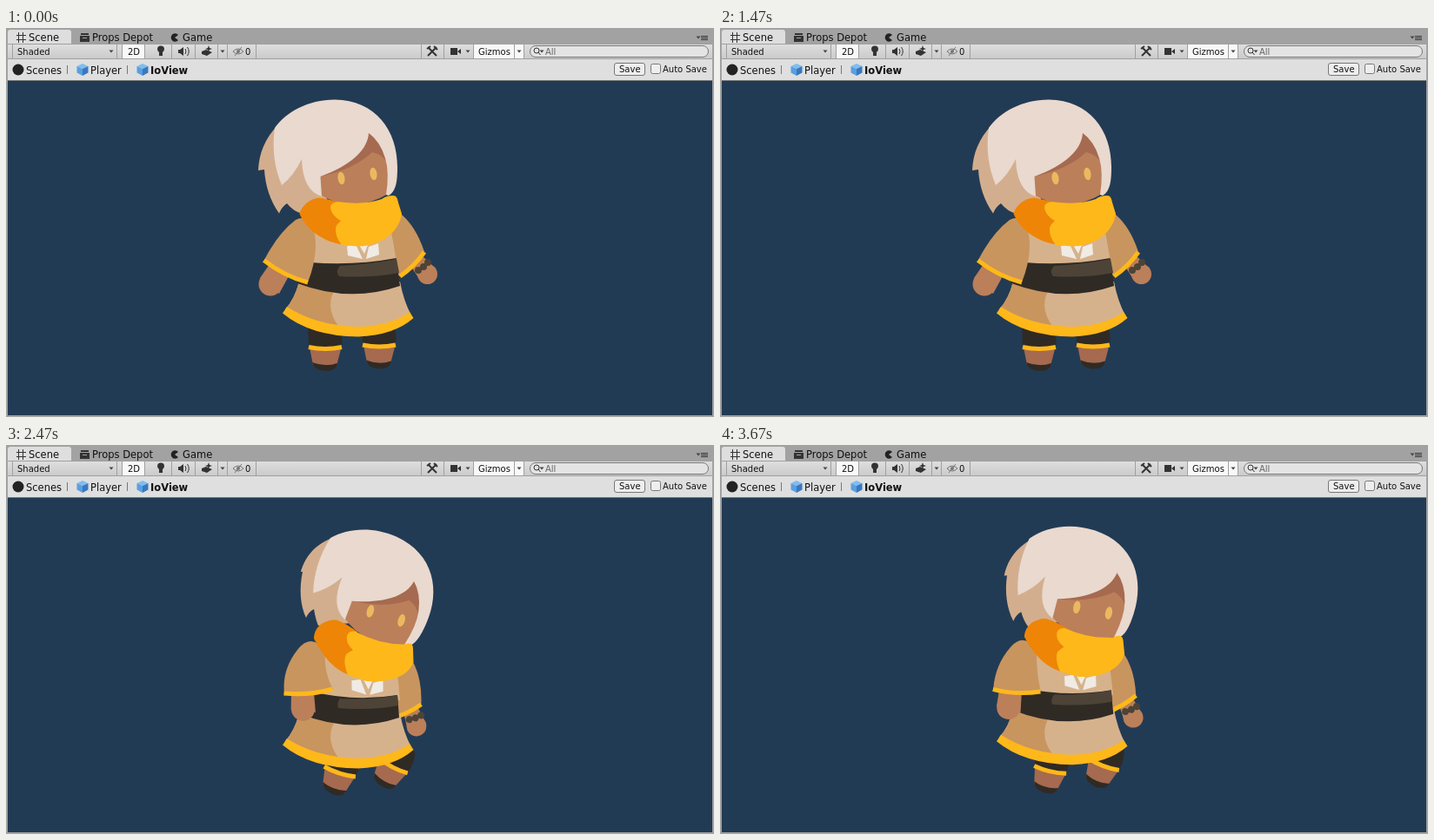
Animation of 814x448 px, one loop 3.94 s. Source, as an HTML page:

```html
<!DOCTYPE html>
<html lang="en">
<head>
<meta charset="utf-8">
<title>Scene view</title>
<style>
  html, body { margin: 0; width: 100%; height: 100%; overflow: hidden; background: #a2a2a2; }
  svg { display: block; }
  text { font: 11.5px "DejaVu Sans", sans-serif; fill: #111; }
  text.s { font-size: 10px; }
  text.b { font-weight: bold; }
  .line { fill: none; stroke: #333; }
  .white { fill: #e9d9cf; } .back { fill: #d3ae8e; } .skin { fill: #bb7f5a; } .shade { fill: #a56a4f; }
  .light { fill: #d6b28c; } .tan { fill: #c8955f; } .dark { fill: #302a25; } .brown { fill: #4d4337; }
  .gold { fill: #feb81a; } .orange { fill: #ee8506; } .collar { fill: #f0ebe4; } .eye { fill: #eab95f; }
  .trim { fill: none; stroke: #feb81a; stroke-width: 5; }
</style>
</head>
<body>
<svg width="814" height="448" viewBox="0 0 814 448">
  <defs>
    <linearGradient id="bar" x2="0" y2="1">
      <stop stop-color="#dedede"/><stop offset="1" stop-color="#cacaca"/>
    </linearGradient>
    <g id="leg">
      <path class="shade" d="M349 368L385.500 368L380 389L353 388Z"/>
      <path class="dark" d="M347 342L382 342Q388 352 386 367Q367 371 348 366Z"/>
      <path class="trim" d="M348 367.500Q367 371.500 386 367.500"/>
      <path class="dark" d="M352 385Q367 391 381 386Q380 395 367 395Q354 394 352 385Z"/>
    </g>
    <g id="cube">
      <path fill="#7fbdf0" d="M0-7L6.500-4L0-1L-6.500-4Z"/>
      <path fill="#5a9fe0" d="M-6.500-4L0-1V7L-6.500 3.500Z"/>
      <path fill="#3978bd" d="M6.500-4L0-1V7L6.500 3.500Z"/>
    </g>
    <path id="drop" fill="#444" d="M-2.500-1.500H2.500L0 1.500Z"/>
  </defs>

  <!-- tabs -->
  <path fill="#dedede" d="M2 19V5Q2 2 5 2H72Q75 2 75 5V19Z"/>
  <path class="line" d="M14.500 5V17M19.500 5V17M12 8.500H23M12 13.500H23"/>
  <text x="26" y="15">Scene</text>
  <path fill="#333" d="M85 9H96V16H85ZM86 6H95V8H86Z"/>
  <path class="line" style="stroke:#a2a2a2" d="M88 11.500H93"/>
  <text x="99" y="15">Props Depot</text>
  <path fill="#222" d="M198 8A4.700 4.700 0 1 0 198 14L194 11Z"/>
  <text x="203" y="15">Game</text>
  <path class="line" d="M799 9.500H807M799 11.500H807M799 13.500H807"/>
  <use href="#drop" x="796" y="11"/>

  <!-- toolbar -->
  <path fill="url(#bar)" d="M2 19H812V36H2Z"/>
  <path fill="#f8f8f8" d="M134 19H159V35H134ZM538 19H595V35H538Z"/>
  <path class="line" style="stroke:#a0a0a0" d="M2 18.500H812M2 35.500H812M7.500 19V35M127.500 19V35M133.500 19V35M159.500 19V35M190.500 19V35M217.500 19V35M243.500 19V35M254.500 19V35M287.500 19V35M477.500 19V35M503.500 19V35M537.500 19V35M584.500 19V35M595.500 19V35"/>
  <text class="s" x="13" y="31">Shaded</text>
  <use href="#drop" x="121" y="27"/>
  <text class="s" x="140" y="31">2D</text>
  <path fill="#333" d="M176 28Q174 26 174 24.500A4 4 0 0 1 182 24.500Q182 26 180 28V32H176Z"/>
  <path fill="#333" d="M198 25H200L204 22V32L200 29H198Z"/>
  <path class="line" d="M206 24Q208 27 206 30M208.500 22Q212 27 208.500 32"/>
  <path fill="#333" d="M225 27L230 25L237 28L231 32L225 30ZM233 20L234 23L237 24L234 25L233 27L232 25L229 24L232 23Z"/>
  <use href="#drop" x="249" y="27"/>
  <path class="line" style="stroke:#777" d="M261 27Q267 21 273 27Q267 33 261 27M263 32L271 22"/>
  <circle cx="267" cy="27" r="2" fill="#777"/>
  <text class="s" x="275" y="31">0</text>
  <path class="line" stroke-width="2" d="M485 22L495 32M495 22L485 32M484 24L488 21M492 21L496 25"/>
  <path fill="#333" d="M511 23H519V31H511ZM519 27L523 24V30Z"/>
  <use href="#drop" x="531" y="27"/>
  <text class="s" x="543" y="31">Gizmos</text>
  <use href="#drop" x="590" y="27"/>
  <rect x="602.500" y="20.500" width="205" height="13" rx="6.500" fill="#e4e4e4" stroke="#777"/>
  <circle class="line" cx="610" cy="26" r="3"/>
  <path class="line" d="M612 28L614.500 31"/>
  <use href="#drop" x="616" y="27"/>
  <text class="s" x="620" y="31" style="fill:#666">All</text>

  <!-- breadcrumbs -->
  <path fill="#dfdfdf" d="M2 36H812V60H2Z"/>
  <circle cx="14" cy="48" r="6.500" fill="#222"/>
  <text x="23" y="53">Scenes</text>
  <path class="line" style="stroke:#777" d="M70.500 43V53M139.500 43V53"/>
  <use href="#cube" x="88" y="48"/>
  <text x="97" y="53">Player</text>
  <use href="#cube" x="157" y="48"/>
  <text class="b" x="166" y="53">IoView</text>
  <rect x="699.500" y="40.500" width="35" height="14" rx="2.500" fill="#eee" stroke="#777"/>
  <text class="s" x="705" y="51">Save</text>
  <rect x="741.500" y="41.500" width="11" height="11" rx="2" fill="#eee" stroke="#777"/>
  <text class="s" x="755" y="51">Auto Save</text>

  <path fill="#223b54" d="M2 61H812V446H2Z"/>
  <path class="line" style="stroke:#777" d="M2 60.500H812"/>

  <!-- character: soft parts bend from d to data-lean, rigid groups turn -->
  <g id="legL"><use href="#leg"/></g>
  <g id="legR"><use href="#leg" x="62" y="-2.500"/></g>
  <g id="armR">
    <path class="skin" d="M464 272L478 262L494 277L477 292Z"/>
    <circle class="skin" cx="484.500" cy="283.500" r="11.500"/>
    <g class="brown"><circle cx="474" cy="279" r="4"/><circle cx="480" cy="275" r="4"/><circle cx="485" cy="270" r="4"/></g>
    <path class="tan" d="M438 215H455Q472 230 481 258Q470 274 453 286L436 275Z"/>
    <path class="trim" d="M481 258Q470 274 453 286"/>
  </g>
  <g id="skirt">
    <path class="light" d="M337 292H453Q457 314 466 331Q445 350 402 350Q350 348 321 324Q332 312 337 292Z"/>
    <path class="tan" d="M337 292Q332 312 321 324Q350 347 386 348Q366 325 377 303Z"/>
    <path class="gold" d="M318 328.500Q350 355 405 355.500Q446 354 468.500 334L464 327Q440 344 402 344Q355 342 323 321Z"/>
  </g>
  <g id="torso">
    <path class="light" d="M345 222L441 225Q446 250 449 270L348 276Z"/>
    <path class="collar" d="M392 251L402 249L410 266L393 262ZM417 252L428 248L429 261L414 266ZM406 250H416L412 260Z"/>
  </g>
  <path class="dark" d="M350 270Q400 274 448.500 265L453 297Q395 317 335 294Z"
    data-lean="M352 284Q400 296 450 288L452 314Q395 333 337 309Z"/>
  <path class="brown" d="M384 274Q420 272 449 266L452 282Q420 288 383 286Q378 280 384 274Z"
    data-lean="M384 292Q420 294 450 288L451 300Q420 306 382 303Q380 297 384 292Z"/>
  <g id="handL">
    <path class="skin" d="M303 272L292 288L314 306L326 284Z"/>
    <circle class="skin" cx="304" cy="295" r="13.500"/>
  </g>
  <path class="tan" d="M297 267Q313 236 333 221Q348 213 355 238Q359 262 347 293Q320 286 297 267Z"
    data-lean="M320 286Q317 259 335 236Q350 216 367 236Q365 262 376 281Q348 289 320 286Z"/>
  <path class="trim" d="M296.500 267.500Q320 286 347 293" data-lean="M319.500 286Q348 289 375.500 281"/>
  <path class="back" d="M313 111C297 128 291 145 290 164L297 163C298 182 304 199 314 213.500Q317 206 323 202Q330 211 341 214L370 200L345 120Z"
    data-lean="M375 107C352 116 343 132 339 146L341 146C337 165 338 184 345 199Q348 192 354 189Q356 201 359 208L398 205L390 120Z"/>
  <g id="head">
    <path class="skin" d="M361 165L418 115L441 145V190Q400 215 361 192Z"/>
    <path class="shade" d="M361 171L410 110L441 150L438 155Q432 145 421 143Q400 163 361 171Z"/>
    <path class="white" d="M309 115C322 97 347 82.500 378 82.500C425 83 450 118 450 160C450 175 449 188 440 193L437 192Q441 166 436 150Q430 130 417 121C416 140 397 158 361.500 171L363 194Q341 187 340 151Q331 170 317 181Q304 150 309 115Z"/>
    <ellipse class="eye" cx="385.500" cy="173" rx="4" ry="7.400" transform="rotate(-8 385.500 173)"/>
    <ellipse class="eye" cx="422.500" cy="168" rx="4" ry="7.400" transform="rotate(-8 422.500 168)"/>
  </g>
  <path class="orange" d="M337.500 214C340 204 350 196 361 195.500Q373 198 387 201L390 250C365 247 345 232 337.500 214Z"
    data-lean="M354 223C354 209 366 201 380 201.500Q390 205 404 215L400 267C376 260 364 242 354 223Z"/>
  <path class="gold" d="M373 207C373 202 378 199.500 385 200.500Q412 204 432 197Q437 193 445 193C449 193 450 196 451 201L455 214C452 236 430 251 405 251.500L386 250Q378 240 379 230Q381 225 385 222Q374 216 373 207Z"
    data-lean="M392 224C391 217 396 213 402 215Q430 230 458 229.500Q463 228 466 229C468 231 468 233 468 236L468.500 250C462 268 438 274 415 272L393 265Q387 250 391 241Q395 238 399 236Q392 230 392 224Z"/>
</svg>
<script>
  const LOOP = 3940, RATE = 0.015;  // 15 drawn steps per second

  // part: pivot x, pivot y, shift x, shift y, turn in degrees at full lean
  const rig = {
    legL: [367, 380, 13, 8, 18],
    legR: [430, 377.5, 10, 3, 28],
    armR: [482, 259, -4, 41, 20],
    skirt: [400, 330, 0, 17, 0],
    torso: [411, 256, 5, 21.5, 4],
    handL: [321.5, 283, 28, 1.5, -33.5],
    head: [403.5, 170.5, 32.8, 26, 24.3]
  };

  // turning points of the back-and-forth drag: [step, lean]
  const drag = [[10, 0], [15, 1], [22, 0], [26, 1], [33, 0], [34, 0.02], [37, 1],
    [38, 1], [42, 0.16], [43, 0], [50, 1], [53, 0], [55, 0.75]];

  const bends = [...document.querySelectorAll("[data-lean]")].map(path => ({
    path, from: path.getAttribute("d"), to: path.dataset.lean.match(/[\d.]+/g)
  }));

  function leanAt(step) {
    const next = drag.findIndex(([s]) => s > step);
    if (next === 0) return drag[0][1];
    if (next < 0) return drag[drag.length - 1][1];
    const [s0, a] = drag[next - 1], [s1, b] = drag[next];
    return a + (b - a) * (1 - Math.cos(Math.PI * (step - s0) / (s1 - s0))) / 2;
  }

  function draw(now) {
    const lean = leanAt(Math.floor((now % LOOP + 4) * RATE));
    for (const [id, [px, py, dx, dy, turn]] of Object.entries(rig)) {
      document.getElementById(id).setAttribute("transform",
        `translate(${dx * lean} ${dy * lean}) rotate(${turn * lean} ${px} ${py})`);
    }
    for (const { path, from, to } of bends) {
      let i = 0;
      path.setAttribute("d", from.replace(/[\d.]+/g, n => +n + (to[i++] - n) * lean));
    }
  }

  const start = performance.now();
  function tick() {
    draw(performance.now() - start);
    requestAnimationFrame(tick);
  }
  tick();
</script>
</body>
</html>
```
